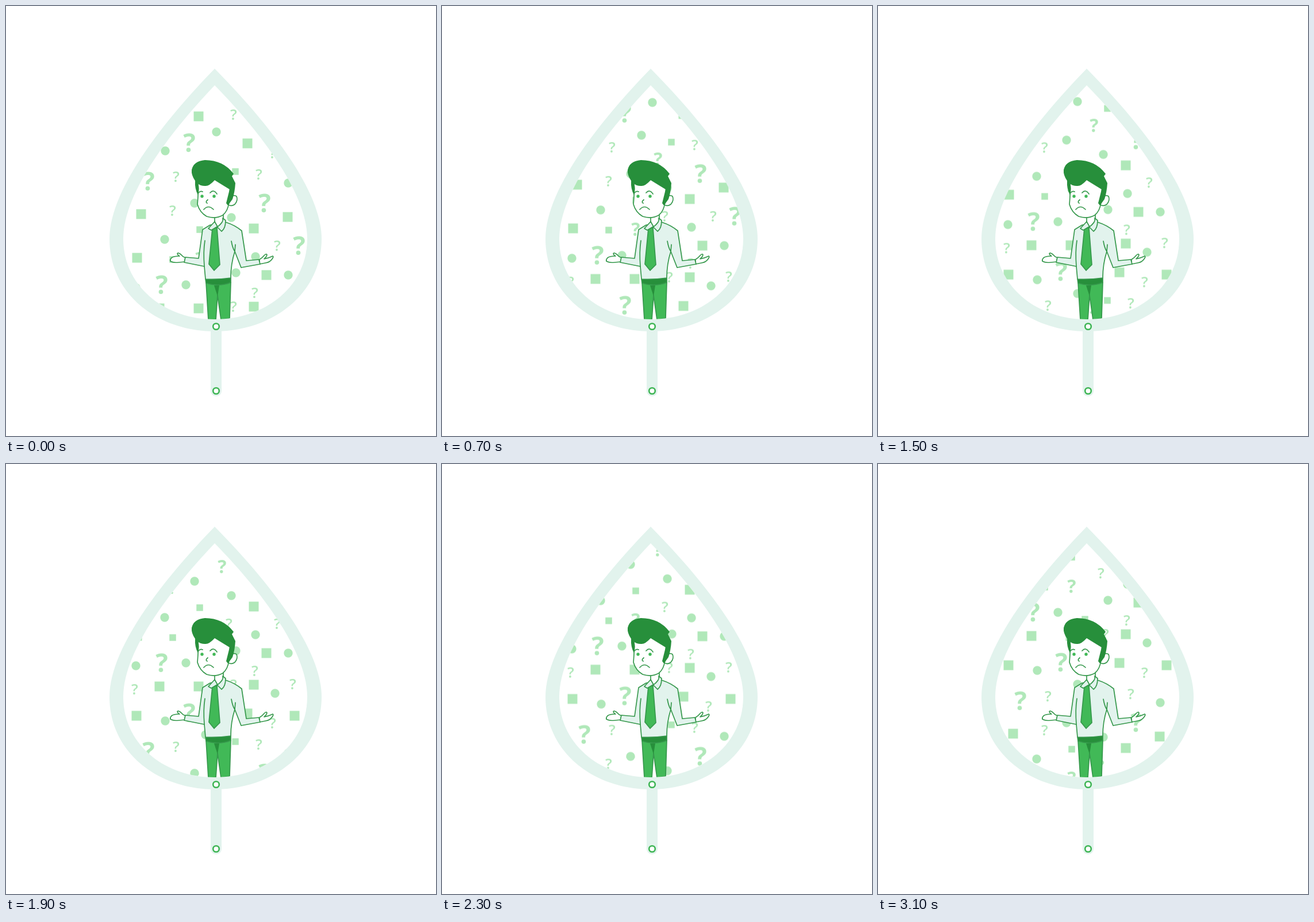
Write an HTML page that moves like this. It is 748 by 748 pixels and loops after 3.2 s.

```html
<!DOCTYPE html>
<html lang="en">
<head>
<meta charset="utf-8">
<title>Undecided man in a leaf</title>
<style>
  html, body { margin: 0; width: 100%; height: 100%; overflow: hidden; background: #fff; }
  svg { display: block; width: 100%; height: 100%; }
  .pale { fill: #e2f3ed; }
  .dark { fill: #278f3b; }
  .mid { fill: #41b957; }
  .white { fill: #fff; }
  .none { fill: none; }
  #symbols { fill: #b0e8b9; font-family: "Open Sans", "Noto Sans", sans-serif; text-anchor: middle; }
  #man { stroke: #36984c; stroke-width: 1.7; stroke-linecap: round; stroke-linejoin: round; }
  .plain { stroke: none; }
  .ring { fill: #fff; stroke: #3eb554; stroke-width: 2.6; }
</style>
</head>
<body>
<svg viewBox="0 0 748 748">
  <defs>
    <path id="inside" d="M363 138C308 196 204 315 204 405C204 487 275 545 363 545C452 545 524 487 524 405C524 315 420 196 363 138Z"/>
    <clipPath id="window"><use href="#inside"/></clipPath>
  </defs>

  <path class="pale" d="M363 109C300 174 180 308 180 405C180 500 262 566 363 566S549 500 549 405C549 308 427 174 363 109Z"/>
  <path class="pale" d="M356 560H375V669.5A9.5 9.5 0 0 1 356 669.5Z"/>
  <use href="#inside" class="white"/>

  <g clip-path="url(#window)">
    <g id="symbols">
      <g id="tile"></g>
      <use href="#tile" y="334"/>
    </g>

    <g id="man">
      <!-- trousers and belt -->
      <path class="mid" d="M348 481L352 546H365L368 503L374 546L389 543L391 481Z"/>
      <path class="dark plain" d="M362 486L368 505L371 486Z"/>
      <path class="dark" d="M347 475L391 473V481Q369 489 348 482Z"/>

      <!-- hands -->
      <path class="white" d="M312 438Q307 436 304 432Q299 428 298 431Q299 434 302 435Q292 435 288 438Q285 441 286 444Q291 447 300 446L311 445Z"/>
      <path class="white" d="M441 441Q446 438 449 434Q453 430 454 433Q453 437 449 440Q456 439 464 435Q466 436 463 440Q459 446 451 447L441 449Z"/>

      <!-- shirt -->
      <path class="pale" d="M342 389L355 381L382 376Q398 381 410 391L418 443L440 441L442 449L409 455L398 427Q391 449 391 473Q369 476 347 475L345 453L310 446L312 437L335 439Z"/>
      <path class="none" d="M346 408Q343 427 345 453M392 409Q394 421 398 427L399 415"/>

      <!-- neck, tie and collar -->
      <path class="white" d="M363 364V378L368 385L378 374V361Z"/>
      <path class="mid" d="M359 387L353 449L362 460L372 450L367 386Z"/>
      <path class="pale" d="M363 375L352 387L357 390L367 384L375 392Q382 387 382 373L377 369Q379 376 368 384Z"/>

      <!-- head -->
      <path class="white" d="M389 334Q395 327 401 331Q404 338 398 345Q393 349 387 346Z"/>
      <path class="white" d="M334 308Q335 322 333 345Q337 359 349 366Q364 371 377 364Q386 357 388 341L390 312L363 301Z"/>
      <path class="dark plain" d="M334 329Q328 318 329 304Q322 294 323 285Q326 270 346 268Q378 268 396 292L393 296L399 308Q398 324 394 336L386 347L383 343L389 319L363 303Q353 314 346 313Q338 313 334 309Q337 316 334 329Z"/>
      <path class="none" d="M335 325Q338 321 342 323M355 325Q361 318 367 327M351 337Q346 341 350 343M344 354Q352 345 361 354"/>
      <g class="mid plain"><circle cx="341" cy="331" r="2.7"/><circle cx="362" cy="331" r="2.7"/></g>
    </g>
  </g>

  <circle class="ring" cx="365.5" cy="557.5" r="5.3"/>
  <circle class="ring" cx="365.5" cy="669.5" r="5.3"/>
</svg>

<script>
const tile = document.getElementById('tile');

function add(name, attrs, text = '') {
  const node = document.createElementNS('http://www.w3.org/2000/svg', name);
  for (const key in attrs) node.setAttribute(key, attrs[key]);
  node.textContent = text;
  tile.append(node);
}

const square = size => (x, y) =>
  add('rect', { x: x - size / 2, y: y - size / 2, width: size, height: size });
const disc = (x, y) => add('circle', { cx: x, cy: y, r: 7.7 });
const query = (size, weight) => (x, y) =>
  add('text', { x, y: y + size * 0.36, 'font-size': size, 'font-weight': weight }, '?');

// Each kind of symbol with the centres it is placed at.
const layout = [
  [square(17), [[335, 192], [420, 239], [502, 243], [227, 243], [235, 362], [490, 367],
    [431, 387], [228, 438], [453, 468], [431, 523], [267, 526]]],
  [square(11.5), [[399, 288], [337, 389], [290, 441], [360, 497]]],
  [disc, [[366, 219], [277, 252], [347, 276], [491, 308], [328, 343], [392, 368], [276, 406],
    [434, 436], [400, 464], [491, 468], [313, 485], [226, 490], [468, 538]]],
  [query(45, 700), [[319, 238], [248, 305], [450, 343], [510, 417], [271, 485]]],
  [query(32, 700), [[376, 317], [337, 439]]],
  [query(26, 600), [[396, 189], [464, 256], [440, 293], [296, 297], [290, 356], [472, 417],
    [388, 417], [433, 499], [499, 522], [224, 531]]]
];
for (const [draw, centres] of layout) centres.forEach(([x, y]) => draw(x, y));

// The symbols rise in even steps, then snap back at the end of the loop.
const steps = 32, rise = 7.32;
document.getElementById('symbols').animate(
  [{ transform: 'translateY(0px)' }, { transform: `translateY(${-steps * rise}px)` }],
  { duration: steps * 100, easing: `steps(${steps})`, iterations: Infinity }
);
</script>
</body>
</html>
```
